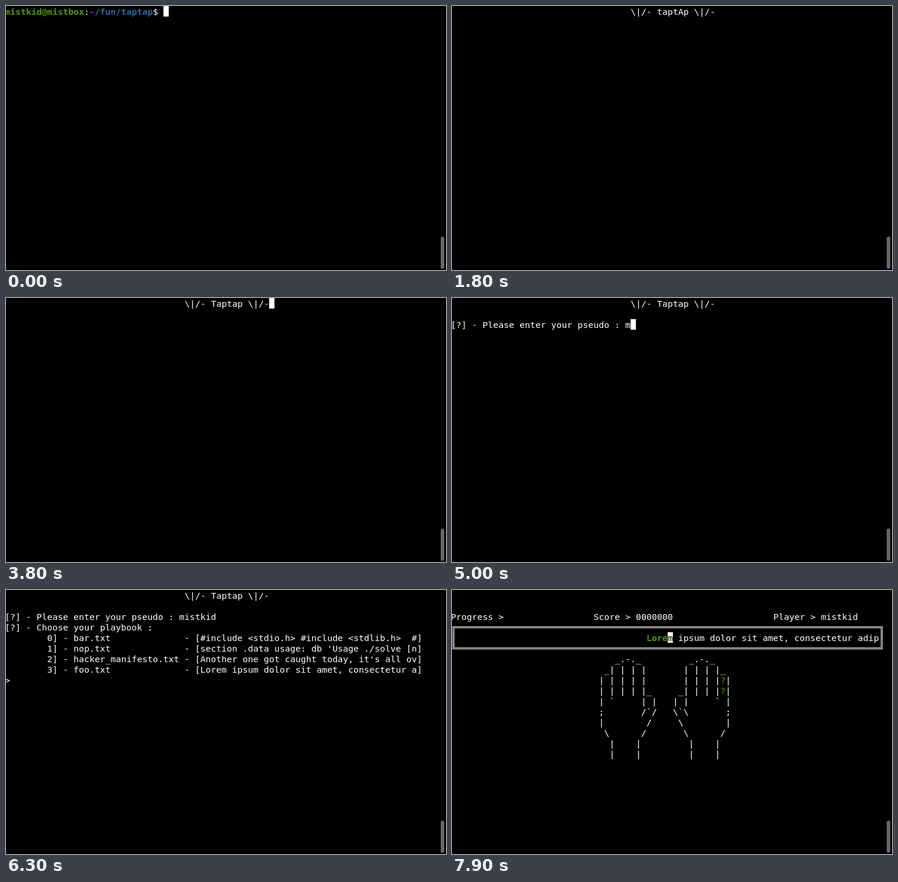
Recreate the animation shown at these times as an HTML page. Size 749x450 px, loop 8000 ms.

```html
<!DOCTYPE html>
<html lang="en">
<head>
<meta charset="utf-8">
<title>Typing game in a terminal</title>
<style>
html, body { margin: 0; width: 100%; height: 100%; overflow: hidden; background: #000; }
#stage { position: relative; width: 749px; height: 450px; overflow: hidden; background: #000; }
#screen { font: 14.95px/20px "DejaVu Sans Mono", "Liberation Mono", monospace; color: #fff; }
#screen span { position: absolute; height: 18px; white-space: pre; }
#screen .user { color: #4e9a06; font-weight: bold; }
#screen .path { color: #3465a4; font-weight: bold; }
#screen .hit { color: #4e9a06; }
#screen .cursor { width: 9px; background: #fff; color: #000; }
#screen .frame { left: 1px; top: 62px; width: 732px; height: 39px; box-sizing: border-box; border: 3px double #fff; }
#bar { position: absolute; left: 740px; top: 393px; width: 6px; height: 55px; border-radius: 3px; background: #686868; }
</style>
</head>
<body>
<div id="stage"><div id="screen"></div><div id="bar"></div></div>
<script>
const LOOP = 8000, CELL_W = 9, CELL_H = 18, LEFT = -2;
const USER = 'mistkid', HOST = 'mistbox';
const CMD = './ta';
const LOREM = 'Lorem ipsum dolor sit amet, consectetur adipiscing elit';
const screen = document.getElementById('screen');

const HANDS = [
  '   _.-._         _.-._',
  ' _| | | |       | | | |_',
  '| | | | |       | | | | |',
  '| | | | |_     _| | | | |',
  '| `     | |   | |     ` |',
  ';       /`/   \\`\\       ;',
  '|        /     \\        |',
  ' \\      /       \\      /',
  '  |    |         |    |',
  '  |    |         |    |'
];

// letter -> [column, first row, last row, mark]
const FINGERS = {
  l: [49, 7, 9, '%'], o: [49, 7, 9, '%'], r: [35, 7, 9, '%'],
  e: [33, 7, 9, '%'], m: [51, 8, 9, '?']
};

const BOOKS = [
  ['bar.txt', '#include <stdio.h> #include <stdlib.h>  #'],
  ['nop.txt', "section .data usage: db 'Usage ./solve [n"],
  ['hacker_manifesto.txt', "Another one got caught today, it's all ov"],
  ['foo.txt', 'Lorem ipsum dolor sit amet, consectetur a']
];

// [start time, scene, step, cursor shown]
const STEPS = [
  [0, shell, 0, 1], [100, shell, 0, 0], [300, shell, 1, 1], [500, shell, 2, 1],
  [600, shell, 3, 1], [800, shell, 4, 1],
  [1000, intro, 5, 0], [1300, intro, 5, 1], [1600, intro, 4, 1], [1800, intro, 4, 0],
  [2200, intro, 3, 0], [2300, intro, 3, 1], [2800, intro, 2, 1], [3000, intro, 2, 0],
  [3300, intro, 1, 0], [3400, intro, 1, 1], [3800, intro, 0, 1], [4000, intro, 0, 0],
  [4500, ask, 0, 0], [4600, ask, 0, 1], [5000, ask, 1, 1], [5100, ask, 2, 1],
  [5200, ask, 4, 1], [5500, ask, 5, 1], [5600, ask, 6, 1], [5700, ask, 7, 1],
  [6000, menu, 0, 1], [6300, menu, 0, 0], [6400, menu, 0, 1], [6500, menu, 1, 1],
  [7000, game, 0], [7300, game, 1], [7500, game, 2], [7700, game, 3], [7900, game, 4]
];

function put(row, col, text, cls = '') {
  const el = document.createElement('span');
  el.className = cls;
  el.textContent = text;
  el.style.left = LEFT + col * CELL_W + 'px';
  el.style.top = row * CELL_H + 'px';
  screen.append(el);
}

function cursor(row, col, shown, char = ' ') {
  if (shown) put(row, col, char, 'cursor');
}

function shell(typed, shown) {
  put(0, 0, USER + '@' + HOST, 'user');
  put(0, 15, ':');
  put(0, 16, '~/fun/taptap', 'path');
  put(0, 28, '$ ' + CMD.slice(0, typed));
  cursor(0, 30 + typed, shown);
}

function title(cap) {
  const word = [...'taptap'].map((c, i) => i === cap ? c.toUpperCase() : c).join('');
  const spin = cap % 2 ? '/-\\|' : '\\|/-';
  put(0, 34, `${spin} ${word} ${spin}`);
}

function intro(cap, shown) {
  title(cap);
  cursor(0, 50, shown);
}

function ask(typed, shown) {
  title(0);
  put(2, 0, '[?] - Please enter your pseudo : ' + USER.slice(0, typed));
  cursor(2, 33 + typed, shown);
}

function menu(typed, shown) {
  ask(USER.length, 0);
  put(3, 0, '[?] - Choose your playbook :');
  BOOKS.forEach(([name, text], i) =>
    put(4 + i, 8, `${i}] - ${name.padEnd(20)} - [${text}]`));
  put(8, 0, '> ' + '3'.slice(0, typed));
  cursor(8, 2 + typed, shown);
}

function game(typed) {
  put(2, 0, 'Progress >');
  put(2, 27, 'Score > 0000000');
  put(2, 61, 'Player > ' + USER);
  const box = document.createElement('span');
  box.className = 'frame';
  screen.append(box);

  put(4, 41 - typed, LOREM.slice(0, typed), 'user');
  cursor(4, 41, true, LOREM[typed]);
  put(4, 42, LOREM.slice(typed + 1, typed + 40));

  HANDS.forEach((line, i) => put(6 + i, 28, line));
  const [col, top, bottom, mark] = FINGERS[LOREM[typed].toLowerCase()];
  for (let row = top; row <= bottom; row++) put(row, col, mark, 'hit');
}

let current = null;
function draw(now) {
  const t = now % LOOP;
  const step = STEPS.findLast(s => s[0] <= t) || STEPS[0];
  if (step !== current) {
    current = step;
    screen.replaceChildren();
    step[1](step[2], step[3]);
  }
}

const start = performance.now();
function tick() {
  draw(performance.now() - start);
  requestAnimationFrame(tick);
}
tick();
</script>
</body>
</html>
```
